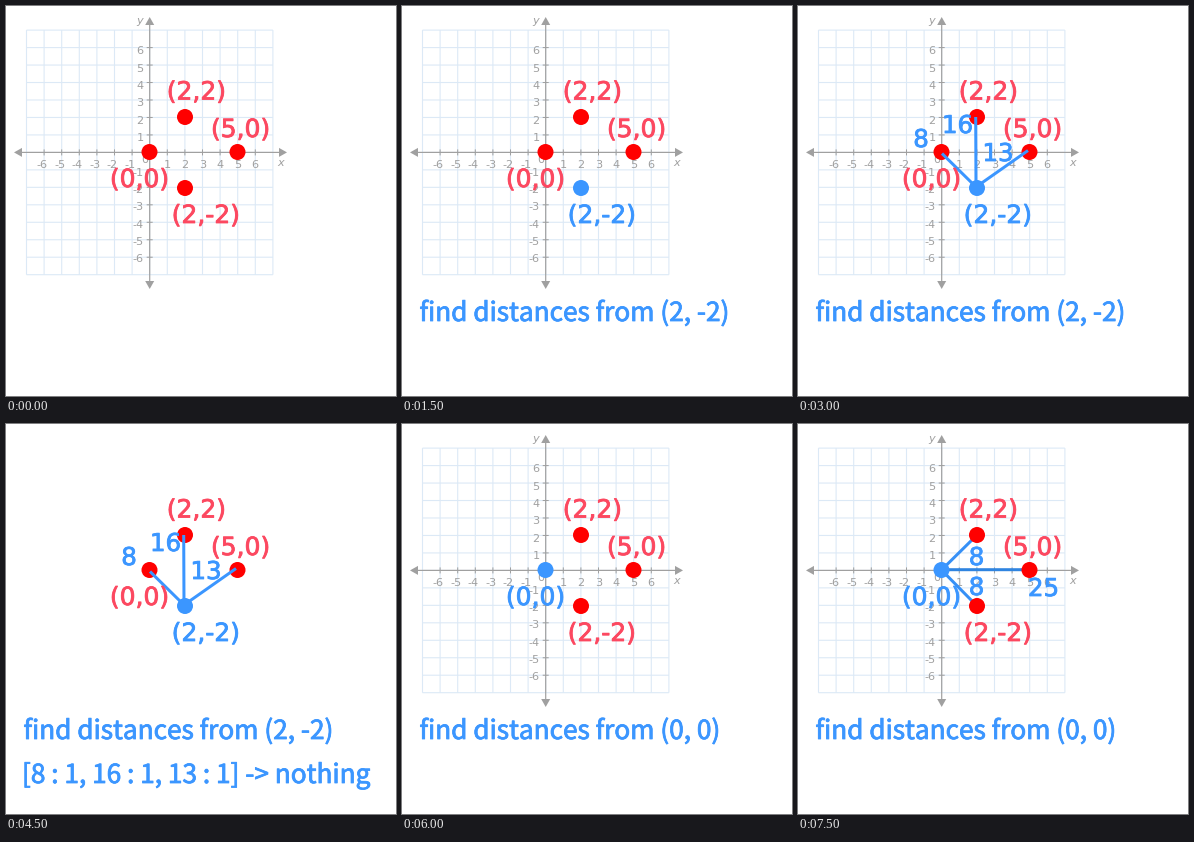
A matplotlib script for the animation above (8 s loop, 390 by 390 pixels).

```python
import matplotlib.pyplot as plt
import matplotlib.patheffects as pe
from matplotlib.animation import FuncAnimation
from matplotlib.patches import Circle, Polygon

SIZE, DPI = 390, 100
PX = 72 / DPI
STEP_MS, FRAMES = 500, 16

RED, ROSE, BLUE = "#ff0000", "#fc4860", "#3b96ff"
GRID, GRAY = "#dce9f6", "#a0a0a0"

X0, Y0, CELL_X, CELL_Y = 143.7, 146.4, 17.6, 17.47

# coordinates: (dot centre, label centre and baseline)
POINTS = {
    (0, 0): ((143.5, 146), (133.5, 181)),
    (2, 2): ((179, 111), (190.5, 93.5)),
    (5, 0): ((231.5, 146), (234.5, 131)),
    (2, -2): ((179, 182), (200, 217)),
}

fig = plt.figure(figsize=(SIZE / DPI, SIZE / DPI), dpi=DPI, facecolor="white")
ax = fig.add_axes([0, 0, 1, 1])


def line(x1, y1, x2, y2, color, width, z):
    ax.plot([x1, x2], [y1, y2], color=color, lw=width * PX, zorder=z,
            solid_capstyle="butt", snap=False)


def write(x, y, text, color, size, family="DejaVu Sans", ha="center"):
    t = ax.text(x, y, text, color=color, fontsize=size * PX, ha=ha,
                va="baseline", family=family, zorder=6)
    t.set_path_effects([pe.withStroke(linewidth=0.8 * PX, foreground=color)])


def sentence(x, y, text):
    write(x, y, text, BLUE, 26.2, "Noto Sans CJK JP", "left")


def small(x, y, text, style="normal"):
    ax.text(x, y, text, color=GRAY, fontsize=11.3 * PX, ha="center",
            va="baseline", family="DejaVu Sans", style=style, zorder=2)


def arrow(x, y, dx, dy):
    bx, by = x - 8 * dx, y - 8 * dy
    ax.add_patch(Polygon([(x, y), (bx - 4.5 * dy, by + 4.5 * dx),
                          (bx + 4.5 * dy, by - 4.5 * dx)],
                         facecolor=GRAY, lw=0, zorder=2))


def draw_plane():
    for k in range(-7, 8):
        x, y = X0 + k * CELL_X, Y0 + k * CELL_Y
        line(x, Y0 - 7 * CELL_Y, x, Y0 + 7 * CELL_Y, GRID, 1.1, 0)
        line(X0 - 7 * CELL_X, y, X0 + 7 * CELL_X, y, GRID, 1.1, 0)
        if k and abs(k) < 7:
            line(x, Y0 - 3, x, Y0 + 3, GRAY, 1, 1)
            line(X0 - 3, y, X0 + 3, y, GRAY, 1, 1)
            small(x - (2 if k < 0 else 0), 162, str(k))
            small(134 if k > 0 else 132.5, 152.3 - 17.35 * k, str(k))
    small(138.5, 157, "0")
    line(10, Y0, 279, Y0, GRAY, 1.2, 1)
    line(X0, 13, X0, 281, GRAY, 1.2, 1)
    arrow(8, Y0, -1, 0)
    arrow(281, Y0, 1, 0)
    arrow(X0, 11, 0, -1)
    arrow(X0, 283, 0, 1)
    small(275, 160.5, "x", "italic")
    small(134, 18, "y", "italic")


def draw_points(active=None):
    for p, (dot, label) in POINTS.items():
        on = p == active
        ax.add_patch(Circle(dot, 8, facecolor=BLUE if on else RED, lw=0,
                            zorder=4))
        write(*label, "({},{})".format(*p), BLUE if on else ROSE, 25)


def draw_task(p):
    sentence(17.5, 315, "find distances from ({}, {})".format(*p))


def draw_lower_spokes():
    for x, y in ((144, 147.5), (177.7, 111), (230, 144.5)):
        line(178, 181, x, y, BLUE, 3, 5)
    for x, y, text in ((123, 141, "8"), (159.5, 127, "16"), (200, 155, "13")):
        write(x, y, text, BLUE, 24.5)


def draw_origin_spokes():
    for x, y in ((179, 111), (179, 182)):
        line(143.5, 146, x, y, "#3690f6", 3, 3)
    line(143.5, 145.7, 231.5, 145.7, "#2f84e0", 3, 3)
    for x, y, text in ((178.5, 141, "8"), (178.5, 171, "8"), (245.5, 172, "25")):
        write(x, y, text, BLUE, 24.5)


def draw(i):
    ax.clear()
    ax.set(xlim=(0, SIZE), ylim=(SIZE, 0))
    ax.axis("off")
    scene = i * STEP_MS // 1500
    active = (None, (2, -2), (2, -2), (2, -2), (0, 0), (0, 0))[scene]
    if scene != 3:
        draw_plane()
    draw_points(active)
    if active:
        draw_task(active)
    if scene in (2, 3):
        draw_lower_spokes()
    if scene == 3:
        sentence(16, 359, "[8 : 1, 16 : 1, 13 : 1] -> nothing")
    if scene == 5:
        draw_origin_spokes()
    return []


anim = FuncAnimation(fig, draw, frames=FRAMES, interval=STEP_MS,
                     init_func=lambda: draw(0), repeat=True, repeat_delay=0,
                     blit=False)
plt.show()
```
